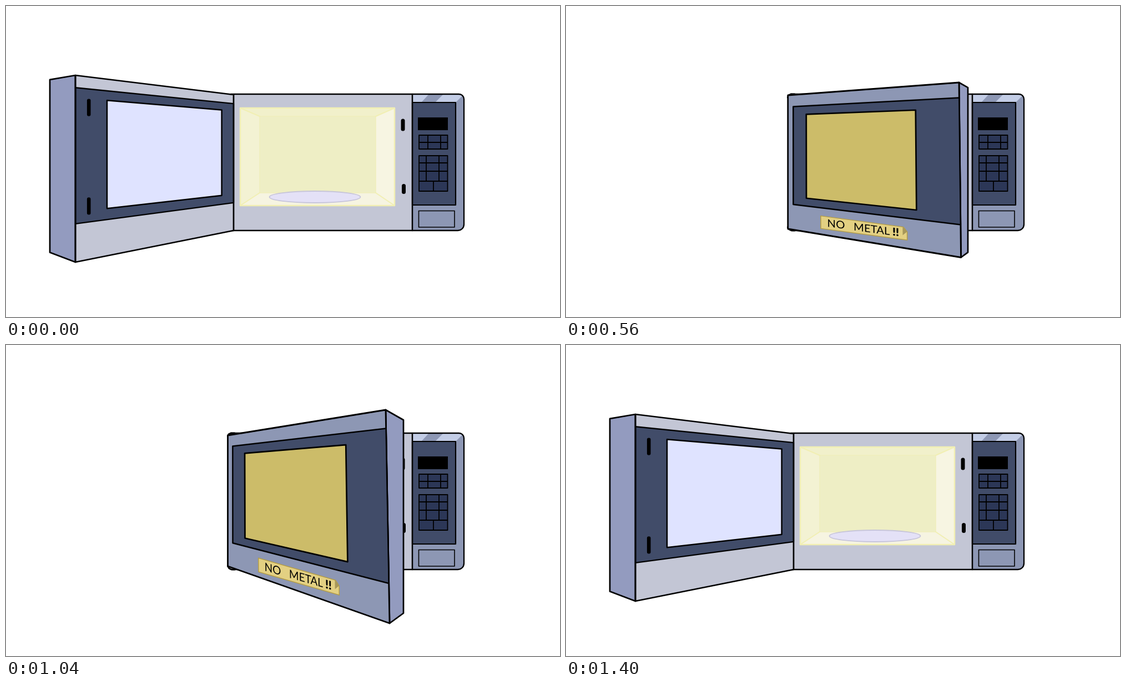
An HTML page with a canvas for the animation above (1.6 s loop, 998 by 561 pixels).

```html
<!DOCTYPE html>
<html lang="en">
<head>
<meta charset="utf-8">
<title>Microwave door</title>
<style>
html, body { margin: 0; width: 100%; height: 100%; overflow: hidden; background: #fff; }
canvas { display: block; width: 998px; height: 561px; }
</style>
</head>
<body>
<canvas id="stage" width="998" height="561"></canvas>
<script>
const ctx = document.getElementById('stage').getContext('2d');
ctx.lineJoin = ctx.lineCap = 'round';

const INK = '#000', METAL = '#8d97b4', EDGE = '#939bbf', INNER = '#c3c6d5';
const DARK = '#414c69', KEYS = '#2c3757', SHINE = '#c3cde6';

// Key positions of the door: hinge edge, free edge, and the signed width of its side.
const key = (hingeX, hingeTop, hingeBottom, freeX, freeTop, freeBottom, spine) =>
  ({ hingeX, hingeTop, hingeBottom, freeX, freeTop, freeBottom, spine });
const WIDE = key(410, 160, 405, 125, 125, 462, -46);
const HALF = key(414, 163, 399, 256, 120, 513, -46);
const EDGE_ON = key(399.5, 162, 402, 489, 122, 541, 36);
const TURNED = key(399.5, 161, 402, 643, 112, 508, 27.5);
const AJAR = key(399.5, 163, 399, 684, 117, 502, 32);
const SHUT = key(400, 159, 405, 732, 159, 405, 0);
const SWING = [WIDE, HALF, EDGE_ON, TURNED, AJAR, SHUT];

// The door closes through these swings and opens back through them.
const CLOSING = [0, 0.35, 0.7, 1, 2, 3, 4, 4.5, 4.8, 5];
const PATH = [...CLOSING, ...CLOSING.slice(0, -1).reverse()];
const TICK = 40;
const HOLDS = [1, 3, 2, 1, 2, 2, 3, 2, 2, 3, 3, 2, 1, 2, 2, 2, 1, 1, 5];
const LOOP = TICK * HOLDS.reduce((sum, hold) => sum + hold);

const mix = (a, b, t) => a + (b - a) * t;

function doorAt(swing) {
  const i = Math.min(Math.floor(swing), SWING.length - 2);
  const door = {};
  for (const name in WIDE) door[name] = mix(SWING[i][name], SWING[i + 1][name], swing - i);
  door.inside = swing <= 1;
  door.lean = door.inside ? 0 : door.spine * 0.22;
  door.taper = door.inside ? swing * 0.068 : 0;
  return door;
}

// Maps a fraction of the door's face to the stage.
function onDoor(door, u, v) {
  const depth = v * (1 + door.taper * (u - 0.5) * (v < 1 ? 1 : 0));
  const top = mix(door.hingeTop, door.freeTop, u);
  const bottom = mix(door.hingeBottom, door.freeBottom, u);
  return [mix(door.hingeX, door.freeX + door.lean * v, u), mix(top, bottom, depth)];
}

const doorRect = (door, u1, v1, u2, v2) =>
  [[u1, v1], [u2, v1], [u2, v2], [u1, v2]].map(([u, v]) => onDoor(door, u, v));

function paint(fill, stroke, width = 2.5) {
  if (fill) { ctx.fillStyle = fill; ctx.fill(); }
  if (stroke) { ctx.strokeStyle = stroke; ctx.lineWidth = width; ctx.stroke(); }
}

function shape(points, fill, stroke, width) {
  ctx.beginPath();
  for (const [x, y] of points) ctx.lineTo(x, y);
  ctx.closePath();
  paint(fill, stroke, width);
}

function line(points, width = 2.5, color = INK) {
  ctx.beginPath();
  for (const [x, y] of points) ctx.lineTo(x, y);
  paint(null, color, width);
}

function box(x1, y1, x2, y2, fill, stroke, width, radius = 0) {
  ctx.beginPath();
  ctx.roundRect(x1, y1, x2 - x1, y2 - y1, radius);
  paint(fill, stroke, width);
}

const corners = (x1, y1, x2, y2) => [[x1, y1], [x2, y1], [x2, y2], [x1, y2]];

function band(x1, x2, top, bottom, slant) {
  shape([[x1 + slant, top], [x2 + slant, top], [x2, bottom], [x1, bottom]], SHINE);
}

function drawTopShine() {
  band(695, 748, 160, 174, 13);
  band(773, 810, 160, 174, 14);
}

function drawCavity() {
  const front = corners(422, 184, 700, 360), back = corners(457, 199, 666, 337);
  const walls = ['#f1f0cb', '#f7f5e2', '#f6f4e1', '#f3f2d3'];
  shape(back, '#eeeec5');
  walls.forEach((color, i) => {
    const next = (i + 1) % 4;
    shape([front[i], front[next], back[next], back[i]], color);
  });
  shape(back, null, '#f0eebd', 1.5);
  front.forEach((corner, i) => line([corner, back[i]], 2, '#f1efb3'));
  shape(front, null, '#f1efb3', 2.5);
  ctx.beginPath();
  ctx.ellipse(556.5, 344.5, 82, 10.5, 0, 0, Math.PI * 2);
  paint('#e4e1f7', '#c7c5da', 1.8);
  line([[715, 207], [715, 222]], 7);
  line([[716.5, 324.5], [716.5, 335.5]], 7);
}

function keypad(top, bottom, columns, rows, columnEnd = bottom) {
  box(744, top, 795.5, bottom, KEYS, INK, 1.8);
  for (const x of columns) line([[x, top], [x, columnEnd]], 1.8);
  for (const y of rows) line([[744, y], [795, y]], 1.8);
}

function drawPanel() {
  ctx.save();
  ctx.beginPath();
  ctx.roundRect(732, 159, 93, 246, [0, 9, 10, 0]);
  ctx.clip();
  box(732, 159, 825, 405, METAL);
  drawTopShine();
  ctx.restore();
  box(732, 174, 810, 359, DARK, INK, 2.2);
  box(742, 201, 796, 224, INK);
  keypad(233, 258, [760, 783], [246]);
  keypad(270, 334, [757, 780], [283, 298, 316], 316);
  line([[770, 316], [770, 334]], 1.8);
  box(743.5, 369.5, 808, 399, null, INK, 1.6);
}

function drawBody(left) {
  box(left, 159, 732, 405, INNER);
  drawCavity();
  drawPanel();
  ctx.beginPath();
  ctx.moveTo(405, 159);
  ctx.arcTo(825, 159, 825, 405, 9);
  ctx.arcTo(825, 405, 408, 405, 11);
  ctx.lineTo(408, 405);
  paint(null, INK, 2.3);
  line([[732, 159], [732, 405]]);
}

function drawLabel([tl, tr, br, bl]) {
  const width = 134, height = 21;
  ctx.save();
  ctx.transform(
    (tr[0] - tl[0]) / width, (tr[1] - tl[1]) / width,
    (bl[0] - tl[0] + br[0] - tr[0]) / 2 / height, (bl[1] - tl[1] + br[1] - tr[1]) / 2 / height,
    tl[0], tl[1]
  );
  shape([[0, 0], [128, 0], [134, 7], [134, 21], [0, 21]], '#e3d082', '#b29b45', 1.3);
  shape([[127, 0], [134, 7], [127, 14]], '#a7975a');
  ctx.fillStyle = INK;
  ctx.font = '17.5px Lato, sans-serif';
  ctx.wordSpacing = '9px';
  ctx.fillText('NO METAL', 10, 16.5);
  ctx.font = '900 18px Lato, sans-serif';
  ctx.fillText('!!', 111, 16.5);
  ctx.restore();
}

function drawSpine({ inside, spine, lean, freeX, freeTop, freeBottom }) {
  const reach = Math.abs(spine), outer = freeX + spine;
  shape([
    [freeX, freeTop],
    [outer, freeTop + reach * (inside ? 0.17 : 0.57)],
    [outer, freeBottom - reach * (inside ? 0.38 : 0.57)],
    [freeX + lean, freeBottom]
  ], EDGE, INK, 2.7);
}

function drawInside(door) {
  const face = doorRect(door, 0, 0, 1, 1);
  const dark = doorRect(door, 0, 0.066, 1, 0.795);
  shape(face, INNER);
  shape(dark, DARK, INK, 2.3);
  shape(doorRect(door, 0.075, 0.12, 0.8, 0.732), '#dfe3ff', INK);
  for (const v of [0.13, 0.67]) line([onDoor(door, 0.915, v), onDoor(door, 0.915, v + 0.075)], 6.6);
  drawSpine(door);
  shape(face, null, INK, 2.7);
}

function drawOutside(door) {
  line([[399.5, 165], [401, 161], [405, 159], [412, 159]], 3);
  line([[399.5, 399], [402, 403], [406, 405], [412, 405]], 3);
  drawSpine(door);
  shape(doorRect(door, 0, 0, 1, 1), METAL, INK, 2.8);
  shape(doorRect(door, 0.031, 0.087, 1, 0.813), DARK, INK);
  shape(doorRect(door, 0.107, 0.148, 0.745, 0.756), '#ccbc69', INK, 2.7);
  drawLabel(doorRect(door, 0.19, 0.87, 0.69, 0.953));
}

function drawShut() {
  const outline = [400, 159, 732, 405];
  const radius = [8, 0, 0, 9];
  box(...outline, METAL, null, 0, radius);
  drawTopShine();
  band(406, 462, 360, 404, 50);
  band(469, 496, 360, 404, 50);
  box(408, 174, 732, 359, DARK, INK);
  box(440, 196, 668, 336, '#4b566f', '#121b3f', 2.4);
  line([[457.5, 202], [457.5, 336]], 1.3, '#27314f');
  drawLabel(corners(508, 372, 642, 393));
  box(...outline, null, INK, 2.5, radius);
}

function swingAt(time) {
  let step = 0;
  for (let end = HOLDS[0] * TICK; time >= end; end += HOLDS[step] * TICK) step++;
  return PATH[step];
}

function draw(time) {
  const swing = swingAt(time);
  const door = doorAt(swing);
  ctx.fillStyle = '#fff';
  ctx.fillRect(0, 0, 998, 561);
  drawBody(door.inside ? 410 : 402);
  if (swing === 5) drawShut();
  else if (door.inside) drawInside(door);
  else drawOutside(door);
}

const began = performance.now();
function tick() {
  draw((performance.now() - began) % LOOP);
  requestAnimationFrame(tick);
}
tick();
</script>
</body>
</html>
```
